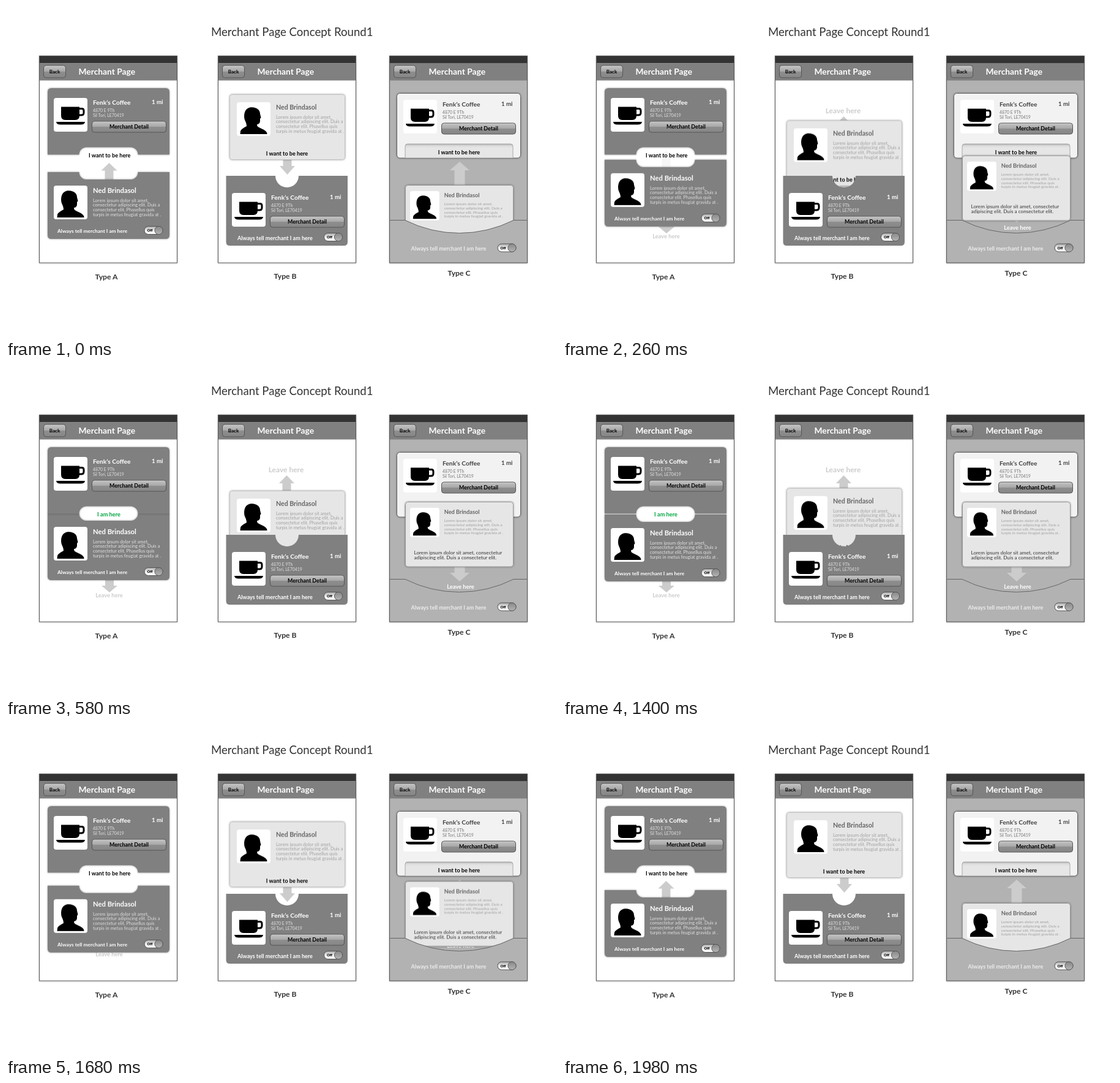
Write an HTML page that moves like this. It is 900 by 540 pixels and loops after 2000 ms.

```html
<!DOCTYPE html>
<html lang="en">
<head>
<meta charset="utf-8">
<title>Merchant Page Concept</title>
<style>
  html, body { margin: 0; width: 100%; height: 100%; overflow: hidden; background: #fff; }
  svg { display: block; width: 900px; height: 540px; font-family: Lato, "Open Sans", sans-serif; }
</style>
</head>
<body>
<svg id="stage" viewBox="0 0 900 540" xmlns="http://www.w3.org/2000/svg"></svg>
<script>
const SHOP = "Fenk’s Coffee", PERSON = "Ned Brindasol";
const ADDRESS = ["4870 E 9Th", "Sil Tori, LE70419"];
const LOREM = [
  "Lorem ipsum dolor sit amet,",
  "consectetur adipiscing elit. Duis a",
  "consectetur elit. Phasellus quis",
  "turpis in metus feugiat gravida at ."
];

const text = (x, y, size, str, fill, weight = 700, anchor = "start") =>
  `<text x="${x}" y="${y}" font-size="${size}" fill="${fill}" font-weight="${weight}" text-anchor="${anchor}">${str}</text>`;
const mid = (x, y, size, str, fill) => text(x, y, size, str, fill, 700, "middle");
const rect = (x, y, w, h, r, fill, more = "") =>
  `<rect x="${x}" y="${y}" width="${w}" height="${h}" rx="${r}" fill="${fill}" ${more}/>`;
const path = (d, fill, more = "") => `<path d="${d}" fill="${fill}" ${more}/>`;
const at = (x, y, body, scale = 1) => `<g transform="translate(${x} ${y}) scale(${scale})">${body}</g>`;
const group = (id, body) => `<g id="${id}">${body}</g>`;

// Arrow with its tip at (x, y); dir 1 points up, -1 points down.
const arrow = (x, y, half, head, stem, length, dir) => {
  const h = y + dir * head, e = y + dir * length;
  return path(`M${x} ${y}L${x + half} ${h}H${x + stem}V${e}H${x - stem}V${h}H${x - half}Z`, "#ccc");
};

const button = (x, y, w, h, label, size) =>
  rect(x + .5, y + .5, w - 1, h - 1, 4, "url(#gloss)", 'stroke="#555"') +
  mid(x + w / 2, y + h / 2 + size * .36, size, label, "#000");

const toggle = (x, y) => at(x, y,
  rect(.5, .5, 30, 13, 6.5, "url(#track)", 'stroke="#555"') +
  text(5, 9.2, 6, "Off", "#000", 900) +
  '<circle cx="24" cy="7" r="6.6" fill="url(#knob)" stroke="#555" stroke-width=".9"/>');

const cup =
  path("M12 14.5H42V29Q42 36 35 36H19Q12 36 12 29Z", "#000") +
  '<path d="M41 17.5H46Q49 17.5 49 21V24Q49 28 45 28H41" fill="none" stroke="#000" stroke-width="3"/>' +
  path("M4 39H51Q50.5 43.5 44 43.5H11Q4.5 43.5 4 39Z", "#000");

const bust = path("M5.5 52L6 47C8 43 13 41 16 39C16 36 15 33 13.5 30C11.5 26 11.5 18 14 14" +
  "C17 8 25 7 31 9.5C36 11.5 38 15 38 19L39.5 25L38 27V31C37.5 35 35 36 33 36" +
  "L33.5 39C36 42 41 42.5 45 45.5C49 48 49.5 50 49.5 52Z", "#000");

const photo = pic => rect(0, 0, 55, 55, 4, "#fff") + pic;

const merchant = (x, y, title, sub) => at(x, y,
  photo(cup) +
  text(64, 11, 10.3, SHOP, title) +
  text(160, 9.5, 9.6, "1 mi", title) +
  ADDRESS.map((s, i) => text(64, 23.2 + i * 8, 6.9, s, sub, 400)).join("") +
  button(62, 37.5, 122, 19, "Merchant Detail", 8.9));

const user = (x, y, size, title, sub, scale) => at(x, y,
  photo(bust) +
  text(64, 11.7, size, PERSON, title) +
  LOREM.map((s, i) => text(64, 26.5 + i * 7.8, 7.5, s, sub, 400)).join(""), scale);

const phone = (x, fill) => at(x, 81,
  rect(.5, .5, 225, 338, 0, fill, 'filter="url(#soft)"') +
  rect(0, 0, 226, 12.5, 0, "#333") +
  rect(0, 12.5, 226, 28, 0, "#808080") +
  rect(.5, .5, 225, 337.5, 0, "none", 'stroke="#555"') +
  button(7, 15.5, 37, 21, "Back", 8.1) +
  text(64.5, 31, 13.8, "Merchant Page", "#fff"));

const defs = `<defs>
  <linearGradient id="gloss" x2="0" y2="1">
    <stop offset="0" stop-color="#d4d4d4"/><stop offset=".15" stop-color="#bbb"/>
    <stop offset=".48" stop-color="#a8a8a8"/><stop offset=".52" stop-color="#8e8e8e"/>
    <stop offset="1" stop-color="#868686"/></linearGradient>
  <linearGradient id="track" x2="0" y2="1">
    <stop offset="0" stop-color="#aaa"/><stop offset=".5" stop-color="#eee"/><stop offset="1" stop-color="#fff"/></linearGradient>
  <linearGradient id="knob" x2="0" y2="1">
    <stop offset="0" stop-color="#888"/><stop offset="1" stop-color="#b4b4b4"/></linearGradient>
  <linearGradient id="slot" x2="0" y2="1">
    <stop offset="0" stop-color="#b4b4b4"/><stop offset=".15" stop-color="#dcdcdc"/><stop offset=".3" stop-color="#e6e6e6"/></linearGradient>
  <filter id="soft" x="-10%" y="-10%" width="120%" height="120%">
    <feDropShadow dx="0" dy="0" stdDeviation="1.6" flood-opacity=".4"/></filter>
  <clipPath id="pocket"><path d="M630 130H850V349H829A197 197 0 0 1 652 349H630Z"/></clipPath>
</defs>`;

const typeA = phone(54, "#fff") +
  mid(168.5, 379, 9.3, "Leave here", "#ccc") +
  arrow(169, 371, 13, 11, 7, 24, -1) +
  group("cardA",
    group("upA", arrow(168.5, 256, 13, 12.5, 7, 29, 1)) +
    path("M68 271H119.5A12 12 0 0 0 131.5 283H203.5A12 12 0 0 0 215.5 271H267V374Q267 380 261 380H74Q68 380 68 374Z",
      "#808080", 'filter="url(#soft)"') +
    user(78, 293, 11.3, "#fff", "#e0e0e0", 1) +
    text(84, 369.5, 8.4, "Always tell merchant I am here", "#fff") +
    toggle(225.5, 359)) +
  path("M68 140Q68 134 74 134H261Q267 134 267 140V242.5H215.5A12 12 0 0 0 203.5 230.5H131.5A12 12 0 0 0 119.5 242.5H68Z",
    "#808080", 'filter="url(#soft)"') +
  merchant(78, 150, "#fff", "#e0e0e0") +
  group("want", mid(169.2, 247, 9.1, "I want to be here", "#000")) +
  group("here", mid(168, 247, 9.2, "I am here", "#00a63f"));

const typeB = phone(346, "#fff") +
  mid(457.5, 174.5, 12, "Leave here", "#ccc") +
  arrow(458.5, 180, 12.5, 13, 7, 28, 1) +
  group("cardB",
    arrow(459.5, 275, 12.5, 14, 7, 26, -1) +
    rect(365.5, 144.5, 188, 106, 4, "#e6e6e6", 'stroke="#c4c4c4" filter="url(#soft)"') +
    user(377, 157, 10.6, "#666", "#a0a0a0", 1) +
    mid(459, 244, 9.1, "I want to be here", "#000")) +
  path("M359.5 277H440A19 19 0 0 0 478 277H558V385Q558 391 552 391H365.5Q359.5 391 359.5 385Z", "#808080") +
  merchant(369, 305, "#fff", "#e0e0e0") +
  text(378, 381.5, 9, "Always tell merchant I am here", "#fff") +
  toggle(519, 370);

const typeC = phone(626, "#b2b2b2") +
  rect(638.5, 142.5, 202, 105.5, 5, "#f2f2f2", 'stroke="#666" filter="url(#soft)"') +
  merchant(649, 153, "#444", "#777") +
  path("M652 247.5V229Q652 225 656 225H824Q828 225 828 229V247.5", "url(#slot)", 'stroke="#999" stroke-width=".8"') +
  mid(740, 241.5, 9.1, "I want to be here", "#000") +
  arrow(741, 254, 16, 14, 8.5, 40, 1) +
  arrow(741, 353, 16, 14, 8.5, 28, -1) +
  mid(742.5, 364.5, 9.3, "Leave here", "#fff") +
  '<g clip-path="url(#pocket)">' +
  group("cardC",
    rect(652.5, 292.5, 176, 105.5, 4, "#e6e6e6", 'stroke="#999" filter="url(#soft)"') +
    user(660, 302, 10.6, "#666", "#a0a0a0", .87) +
    text(666.5, 378, 8.2, "Lorem ipsum dolor sit amet, consectetur", "#333", 400) +
    text(666.5, 386, 8.2, "adipiscing elit. Duis a consectetur elit.", "#333", 400)) +
  "</g>" +
  path("M626.5 349.5H652A197 197 0 0 0 829 349.5H851.5", "none", 'stroke="#666"') +
  text(661.5, 399, 9, "Always tell merchant I am here", "#ececec") +
  toggle(802.5, 387.5);

document.getElementById("stage").innerHTML = defs +
  text(335, 48.5, 18.6, "Merchant Page Concept Round1", "#333", 400) +
  typeA + typeB + typeC +
  mid(164, 446, 12.2, "Type A", "#333") +
  mid(456, 445, 12.2, "Type B", "#333") +
  mid(740, 440, 12.2, "Type C", "#333");

const LOOP = 2000;
const QUAD_OUT = "cubic-bezier(.33333,.66667,.66667,1)";

// Steps are [ms, value, easing towards the next step].
function play(id, prop, steps) {
  const frames = steps.map(([ms, value, easing = "linear"]) =>
    ({ offset: ms / LOOP, [prop]: value, easing }));
  const anim = document.getElementById(id).animate(frames, { duration: LOOP, iterations: Infinity });
  anim.startTime = document.timeline.currentTime;
}

const slide = (id, dy, back, easing) => {
  const rest = "translateY(0px)", moved = `translateY(${dy}px)`;
  play(id, "transform", [[0, rest, QUAD_OUT], [580, moved], [back, moved, easing], [1980, rest], [LOOP, rest]]);
};

slide("cardA", -29, 1380, QUAD_OUT);
slide("cardB", 61, 1380, QUAD_OUT);
slide("cardC", -69, 1400, "linear");
play("upA", "opacity", [[0, 1], [320, 0], [1840, 0], [1980, 1], [LOOP, 1]]);
play("want", "opacity", [[0, 1, "step-end"], [560, 0, "step-end"], [1420, 1], [LOOP, 1]]);
play("here", "opacity", [[0, 0, "step-end"], [560, 1, "step-end"], [1420, 0], [LOOP, 0]]);
</script>
</body>
</html>
```
